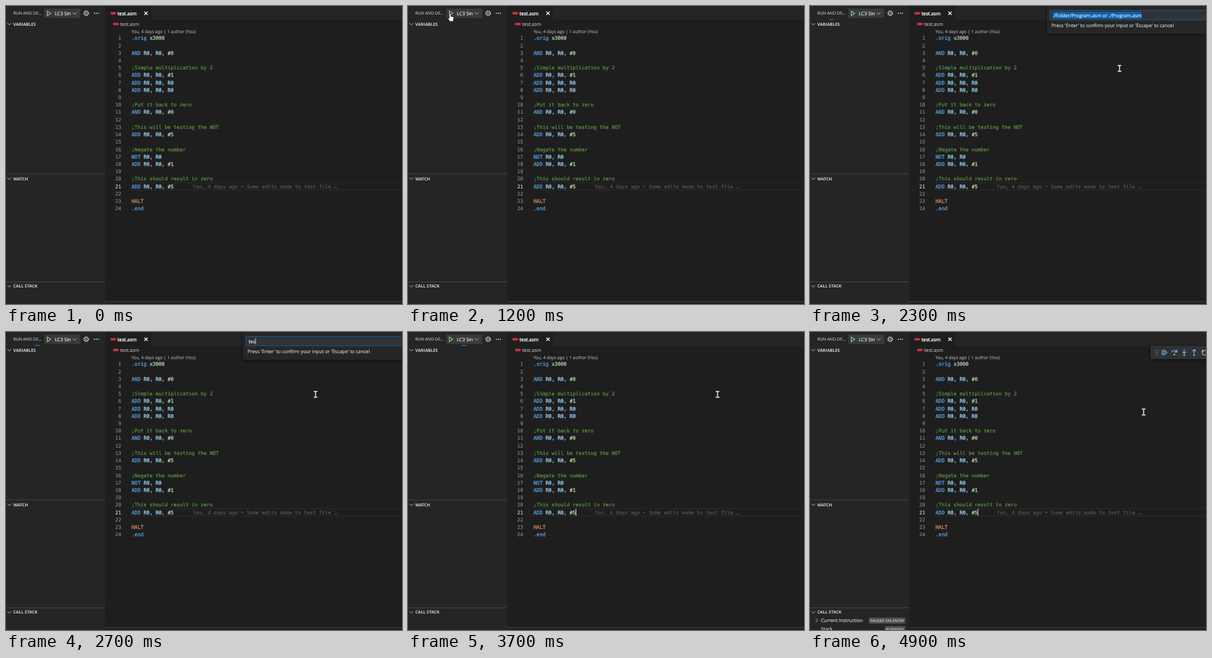
An HTML page for the animation above (5000 ms loop, 600 by 451 pixels).

```html
<!DOCTYPE html>
<html lang="en">
<head>
<meta charset="utf-8">
<title>Debugging an assembly file</title>
<style>
html, body { margin: 0; width: 100%; height: 100%; overflow: hidden; background: #1e1e1e; }
svg { display: block; width: 600px; height: 451px; }
text { white-space: pre; text-rendering: geometricPrecision; font: 7.25px "Open Sans", sans-serif; color: #d4d4d4; }
text, tspan { fill: currentColor; stroke: currentColor; stroke-width: .15px; }
.code, .code text { font: 7.57px "DejaVu Sans Mono", monospace; }
.head { font-size: 6.4px; font-weight: 700; stroke-width: 0; }
.badge { font-size: 5.75px; font-weight: 600; stroke-width: 0; }
.line { fill: none; stroke: #c5c5c5; stroke-width: .9; }
.blue { fill: none; stroke: #75beff; stroke-width: 1.1; }
.op, .reg, .num, .halt { stroke-width: .3px; }
.op { color: #569cd6; }
.reg { color: #9cdcfe; }
.num { color: #b5cea8; }
.note { color: #629b48; }
.halt { color: #ce8068; }
</style>
</head>
<body>
<svg viewBox="0 0 600 451">
  <defs>
    <filter id="shadow" x="-10%" y="-30%" width="120%" height="180%">
      <feDropShadow dx="0" dy="1" stdDeviation="2.5" flood-color="#000" flood-opacity=".6"/>
    </filter>
    <path id="down" d="M-2.8-1.4 0 1.5 2.8-1.4" class="line"/>
    <rect id="file" width="9" height="4" rx="2" fill="#c0323a"/>
  </defs>

  <rect width="600" height="451" fill="#1e1e1e"/>
  <rect width="600" height="21" fill="#252526"/>
  <rect x="150" width="70" height="21" fill="#1e1e1e"/>
  <rect width="150.5" height="451" fill="#252526"/>
  <path d="M0 254H150M0 417.5H150" stroke="#454546"/>
  <path d="M150 447.5H600" stroke="#424242"/>

  <text x="11" y="13.3" style="font-size:6.3px;color:#bbb">RUN AND DE…</text>
  <rect x="58" y="4" width="54.5" height="14" fill="#3a3a3b"/>
  <path d="M62.6 7.6 67.8 11 62.6 14.6Z" fill="none" stroke="#89d185" stroke-width="1.1"/>
  <text x="74" y="13.6" style="color:#f0f0f0">LC3 Sin</text>
  <use href="#down" x="104" y="11"/>
  <circle cx="121.5" cy="11" r="3.5" class="line" stroke-dasharray="1.6 1.15" style="stroke-width:1.6"/>
  <circle cx="121.5" cy="11" r="2.7" class="line"/>
  <circle cx="121.5" cy="11" r=".9" fill="#c5c5c5"/>
  <g fill="#c5c5c5"><circle cx="134" cy="11" r=".9"/><circle cx="137" cy="11" r=".9"/><circle cx="140" cy="11" r=".9"/></g>

  <use href="#down" x="5" y="27.3"/><text class="head" x="11" y="29.7">VARIABLES</text>
  <use href="#down" x="5" y="261.3"/><text class="head" x="11" y="263.7">WATCH</text>
  <use href="#down" x="5" y="424"/><text class="head" x="11" y="426.4">CALL STACK</text>

  <use href="#file" x="158" y="9"/>
  <text x="169" y="13.8" style="color:#fff;stroke-width:.3px">test.asm</text>
  <path d="M209.6 8.5 214.6 13.5M214.6 8.5 209.6 13.5" class="line" style="stroke:#fff;stroke-width:1.1"/>
  <use href="#file" x="162" y="25.3"/>
  <text x="173" y="30" style="color:#b4b4b4">test.asm</text>
  <text x="190" y="41.3" style="font-size:6.58px;color:#a4a4a4">You, 4 days ago | 1 author (You)</text>
  <path d="M190 267.3H600M190 278.4H600" stroke="#2b2b2b"/>
  <g id="code" class="code"></g>
  <path id="caret" d="M254.5 267.5V278" stroke="#ddd"/>

  <g id="collapse" class="line">
    <path d="M140.3 26V24H145.3V29H143.6"/><path d="M138.5 26H143.5V30.6H138.5ZM139.7 28.3H142.3"/>
  </g>
  <rect id="bar" y="19.5" height="1.5" fill="#0e70c0"/>

  <g id="prompt">
    <rect x="359" y="-4" width="250" height="46" fill="#252526" filter="url(#shadow)"/>
    <rect x="363.5" y="6.5" width="245" height="14.5" fill="#323236" stroke="#0d5a96"/>
    <rect id="sel" x="367.5" y="8.8" height="10.5" fill="#1062ac"/>
    <text id="typed" x="367.5" y="16.7" style="color:#eee"></text>
    <path id="mark" d="M0 9.5V18.5" stroke="#ddd" stroke-width=".9"/>
    <text x="366" y="32">Press 'Enter' to confirm your input or 'Escape' to cancel</text>
  </g>

  <g id="debug">
    <rect x="516" y="21" width="95" height="20" fill="#333" filter="url(#shadow)"/>
    <path d="M524.2 27.5V36M526.8 27.5V36" stroke="#8a8a8a" stroke-width="1.2" stroke-dasharray="1.2 1.9"/>
    <g class="blue">
      <path d="M533.5 27V35M536 27.3 540.8 31 536 34.7Z"/>
      <path d="M548 30.5A4 3.8 0 0 1 555.3 30M555.8 26.8V30.4H552.2"/>
      <path d="M567 26.3V32.2M564.4 29.8 567 32.4 569.6 29.8"/>
      <path d="M582 33V26.8M579.4 29.2 582 26.6 584.6 29.2"/>
    </g>
    <g fill="#75beff"><circle cx="552" cy="34" r="1.3"/><circle cx="567" cy="35" r="1.3"/><circle cx="582" cy="35" r="1.3"/></g>
    <path d="M600.5 28.6A3.7 3.7 0 1 0 601.5 32M594.2 26.8V29.6H597" fill="none" stroke="#89d185" stroke-width="1.1"/>
    <path d="M8.8 433.4 11.8 436.4 8.8 439.4" class="line"/>
    <text x="16.5" y="439" style="font-size:7.15px">Current Instruction</text>
    <text x="16.5" y="451.8" style="font-size:7.15px">Stack</text>
    <rect x="89" y="432" width="55.5" height="9.5" rx="1" fill="#4d4d4e"/>
    <text class="badge" x="91" y="438.8">PAUSED ON ENTRY</text>
    <rect x="113" y="445" width="31.5" height="9.5" rx="1" fill="#4d4d4e"/>
    <text class="badge" x="115" y="451.6">RUNNING</text>
  </g>

  <g id="pointer">
    <path id="arrow" d="M.5 .8V10L2.6 8.1 4.2 11.4 5.5 10.8 4 7.5H7Z" fill="#161616" stroke="#e8e8e8" stroke-width=".8"/>
    <path id="hand" d="M-1.2 1Q0-.8 1 1V4.4L4.6 5.3Q5.6 5.7 5.3 7.2L4.3 11.8H-.8L-3.2 7.8Q-3.4 6.4-1.2 7.2Z" fill="#fff" stroke="#111" stroke-width=".6"/>
    <path id="beam" d="M-2.8-4.4H2.8M-2.8 4.4H2.8M0-4.4V4.4" fill="none" stroke="#e4e4e4" stroke-width="1.5"/>
  </g>
</svg>
<script>
const LOOP = 5000, STEP = 100;
const $ = id => document.getElementById(id);
const show = (id, on) => $(id).setAttribute("display", on ? "inline" : "none");

const program = `.orig x3000

AND R0, R0, #0

;Simple multiplication by 2
ADD R0, R0, #1
ADD R0, R0, R0
ADD R0, R0, R0

;Put it back to zero
AND R0, R0, #0

;This will be testing the NOT
ADD R0, R0, #5

;Negate the number
NOT R0, R0
ADD R0, R0, #1

;This should result in zero
ADD R0, R0, #5

HALT
.end`.split("\n");

function kind(token) {
  if (token[0] === ";") return "note";
  if (/^(#|x\d)/.test(token)) return "num";
  if (/^R\d/.test(token)) return "reg";
  if (token === "HALT") return "halt";
  return /^[.A-Z]/.test(token) ? "op" : "";
}

const paint = line => (line.match(/;.*|[#.]?\w+|[, ]+/g) || [])
  .map(t => `<tspan class="${kind(t)}">${t}</tspan>`).join("");

$("code").innerHTML = program.map((line, i) => {
  const y = 51.3 + i * 11.217;
  const shade = i === 20 ? "#d0d0d0" : "#858585";
  return `<text x="174.5" y="${y}" text-anchor="end" style="color:${shade}">${i + 1}</text>` +
    `<text x="190.3" y="${y}">${paint(line)}</text>`;
}).join("") +
  `<text x="283" y="275.6" style="color:#585858">You, 4 days ago • Some edits made to test file …</text>`;

// time, x, y
const path = [
  [100, 296, 412], [200, 235, 310], [300, 150, 185], [400, 70, 75], [500, 46, 30],
  [600, 44, 26], [800, 44, 25], [1000, 62, 12], [1300, 65, 11], [1500, 77, 25],
  [1600, 150, 48], [1700, 300, 78], [1800, 420, 92], [2000, 469, 94.4],
  [4600, 469, 94.4], [4700, 475, 100], [4800, 491, 112], [4900, 505.5, 121]
];

// time, text in the input
const typing = [
  [1400, "./Folder/Program.asm or ./Program.asm"], [2400, "t"], [2500, "te"], [2700, "tes"],
  [2800, "test"], [3000, "test."], [3100, "test.a"], [3200, "test.as"], [3300, "test.asm"]
];

function place(t) {
  const i = path.findIndex(p => p[0] >= t);
  if (i < 1) return path[0].slice(1);
  const [t0, x0, y0] = path[i - 1], [t1, x1, y1] = path[i];
  const k = (t - t0) / (t1 - t0);
  return [x0 + (x1 - x0) * k, y0 + (y1 - y0) * k];
}

function drawPointer(t) {
  const [x, y] = place(t);
  const shape = x > 150 ? "beam" : t >= 1000 ? "hand" : "arrow";
  show("pointer", t >= path[0][0]);
  $("pointer").setAttribute("transform", `translate(${x} ${y})`);
  for (const id of ["arrow", "hand", "beam"]) show(id, id === shape);
  show("collapse", x < 150 && y > 20 && t >= 400 && t < 1000);
}

function drawBar(t) {
  const p = (t - 1470) / 4000;
  show("bar", p >= 0 && t < 3800);
  const w = Math.max(0, 3 + 12 * Math.min(p, 1 - p));
  $("bar").setAttribute("x", Math.max(0, 150 * p + 1.5 - w / 2));
  $("bar").setAttribute("width", w);
}

function drawPrompt(t) {
  const open = t >= 1400 && t < 3700;
  show("prompt", open);
  if (!open) return;
  const text = typing.filter(s => s[0] <= t).pop()[1];
  const field = $("typed");
  const fresh = t < 2400;
  if (field.textContent !== text) field.textContent = text;
  const w = field.getComputedTextLength();
  $("sel").setAttribute("width", w);
  show("sel", fresh);
  show("mark", !fresh);
  $("mark").setAttribute("transform", `translate(${368 + w} 0)`);
}

function draw(now) {
  const t = Math.floor(now % LOOP / STEP) * STEP;
  drawPointer(t);
  drawBar(t);
  drawPrompt(t);
  show("debug", t >= 3900);
  show("caret", t >= 3700 && t < 4200 || t >= 4700);
}

const start = performance.now();
function tick() {
  draw(performance.now() - start);
  requestAnimationFrame(tick);
}
tick();
</script>
</body>
</html>
```
